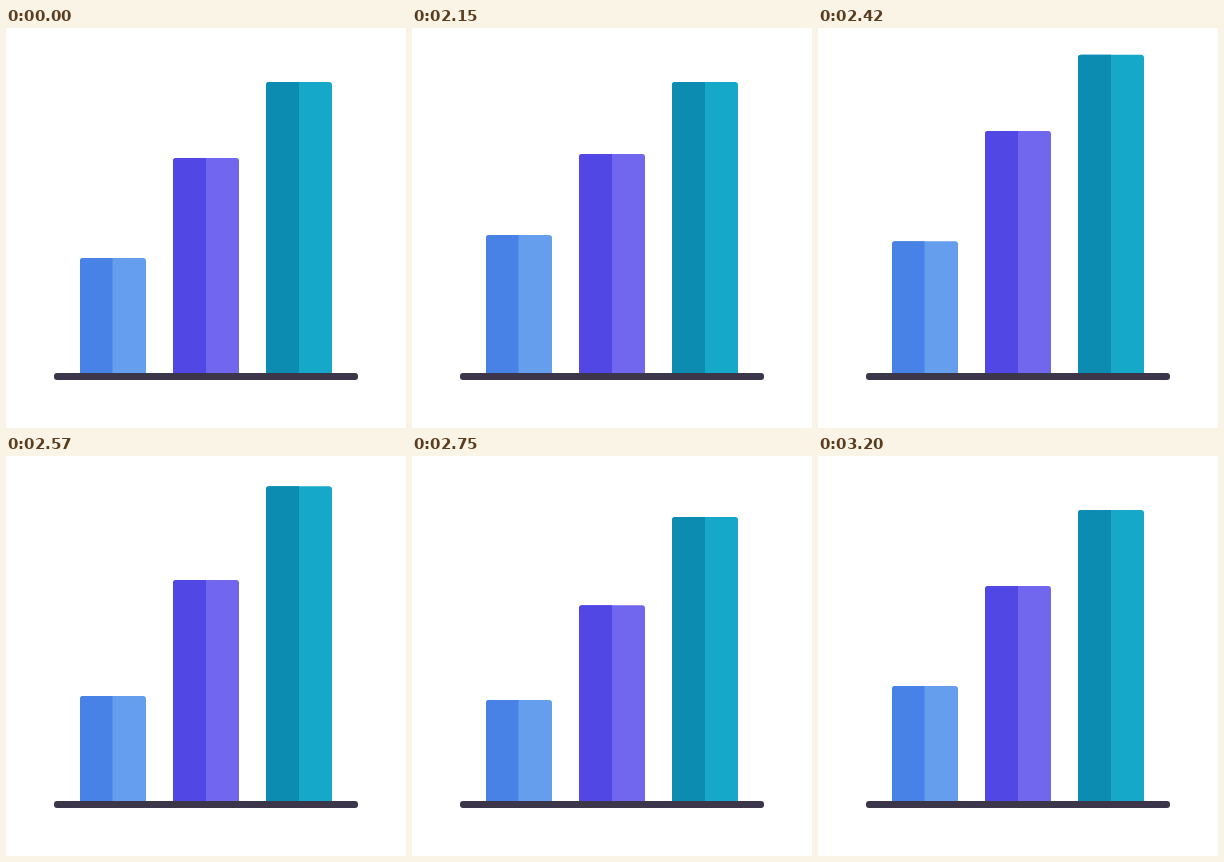
These frames come from a looping animation (400x400 px, 3230 ms). An HTML page:

```html
<!DOCTYPE html>
<html lang="en">
<head>
<meta charset="utf-8">
<title>Bar chart</title>
<style>
  html, body { margin: 0; width: 100%; height: 100%; overflow: hidden; background: #fff; }
  svg { display: block; width: 100%; height: 100%; }
</style>
</head>
<body>
<svg id="stage" viewBox="0 0 400 400">
  <rect width="400" height="400" fill="#fff"/>
  <g id="bars"></g>
  <rect x="48" y="345" width="304" height="7" rx="3" fill="#3b364a"/>
</svg>
<script>
const LOOP = 3230, HOLD = 2030, STEP = 30, START = 2000;
const WIDTH = 66, FLOOR = 348, RADIUS = 3;

const bars = [
  { x: 74, split: 32.5, top: 230, delay: 0, dark: '#4882e6', light: '#659eed' },
  { x: 167, split: 33, top: 130, delay: 100, dark: '#5147e4', light: '#7166ee' },
  { x: 260, split: 33, top: 54, delay: 200, dark: '#0c8cb0', light: '#15a8c8' }
];

// Swing of a bar top: [ms since its start, offset in px]
const swing = [
  [0, 0], [30, -1.2], [50, -4], [150, -22.9], [220, -27.3], [268, -28],
  [320, -27.1], [370, -23.8], [420, -16.7], [470, -6.1], [550, 7],
  [570, 10.1], [650, 19.2], [672, 19.8], [750, 14], [833, 4.6], [917, 0.9], [1000, 0]
];

const slope = i => (swing[i + 1][1] - swing[i][1]) / (swing[i + 1][0] - swing[i][0]);

// Monotone tangents: flat at the turning points, harmonic mean elsewhere
const tangents = swing.map((p, i) => {
  if (i === 0 || i === swing.length - 1) return 0;
  const a = slope(i - 1), b = slope(i);
  return a * b > 0 ? 2 * a * b / (a + b) : 0;
});

function offset(ms) {
  if (ms <= 0 || ms >= 1000) return 0;
  let i = 0;
  while (ms > swing[i + 1][0]) i++;
  const [t0, y0] = swing[i], [t1, y1] = swing[i + 1];
  const h = t1 - t0, u = (ms - t0) / h, v = 1 - u;
  return y0 * (1 + 2 * u) * v * v + y1 * u * u * (3 - 2 * u)
    + h * u * v * (tangents[i] * v - tangents[i + 1] * u);
}

function addPath(fill) {
  const path = document.createElementNS('http://www.w3.org/2000/svg', 'path');
  path.setAttribute('fill', fill);
  document.getElementById('bars').appendChild(path);
  return path;
}

for (const bar of bars) {
  bar.full = addPath(bar.light);
  bar.half = addPath(bar.dark);
}

function draw(time) {
  const t = time % LOOP;
  const at = t < HOLD ? 0 : HOLD + Math.floor((t - HOLD) / STEP) * STEP;
  for (const { x, split, top, delay, full, half } of bars) {
    const y = top + offset(at - START - delay);
    const left = `M${x} ${FLOOR}V${y + RADIUS}q0 ${-RADIUS} ${RADIUS} ${-RADIUS}`;
    full.setAttribute('d', `${left}H${x + WIDTH - RADIUS}q${RADIUS} 0 ${RADIUS} ${RADIUS}V${FLOOR}Z`);
    half.setAttribute('d', `${left}H${x + split}V${FLOOR}Z`);
  }
}

const origin = performance.now();
function tick() {
  draw(performance.now() - origin);
  requestAnimationFrame(tick);
}
tick();
</script>
</body>
</html>
```
